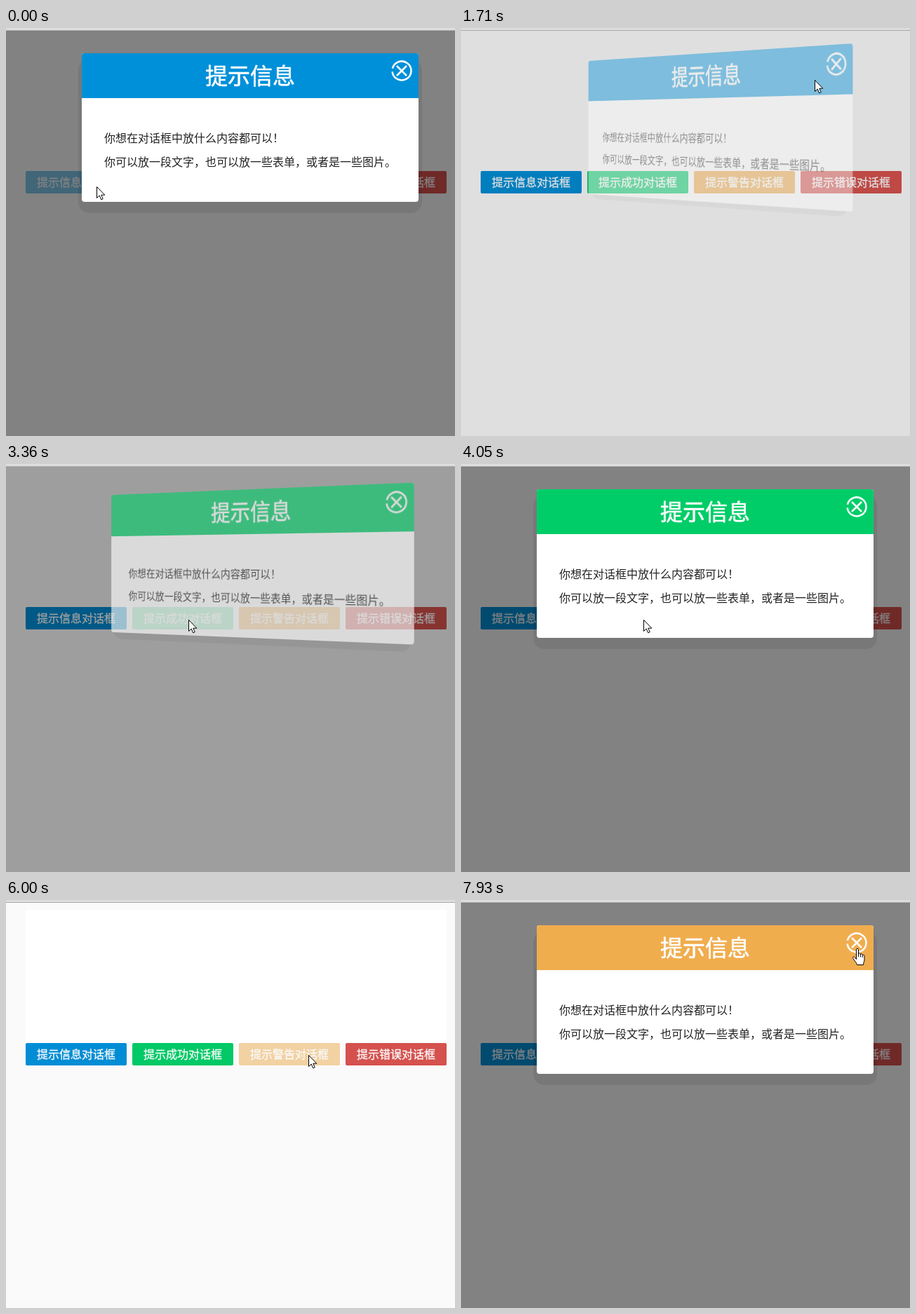
These frames come from a looping animation (640x582 px, 8 s). An HTML page:

```html
<!DOCTYPE html>
<html lang="zh-CN">
<head>
<meta charset="utf-8">
<title>提示信息对话框</title>
<style>
  html, body { margin: 0; width: 100%; height: 100%; overflow: hidden; background: #fff; }
  body { position: relative; font: 16px "Noto Sans CJK SC", "Noto Sans CJK", sans-serif; --blue: #0090d9; --green: #00cd68; --orange: #f0ad4e; --red: #d9534f; }
  div, svg { position: absolute; }
  div { white-space: nowrap; }
  #bar { left: 0; top: 0; width: 100%; height: 3px; background: #dedede; border-bottom: 1px solid #a9a9a9; }
  .btn { top: 204px; width: 144px; height: 32px; line-height: 31px; border-radius: 2px; text-align: center; color: #fff; -webkit-text-stroke: .3px; }
  #overlay { left: 0; top: 4px; right: 0; bottom: 0; background: #000; }
  #blank { left: 28px; top: 14px; width: 600px; height: 190px; background: #fff; }
  #dialog { left: 108px; top: 36px; width: 480px; height: 212px; will-change: opacity; }
  #shadow { z-index: -1; top: 8px; border-radius: 16px; background: rgba(0, 0, 0, .07); }
  #panel { inset: 0; border-radius: 4px; background: #fff; overflow: hidden; }
  #head { left: 0; top: 0; width: 480px; height: 64px; line-height: 60px; font-size: 32px; text-align: center; color: #fff; -webkit-text-stroke: .6px; }
  .line { left: 32px; height: 34px; line-height: 34px; color: #222; }
  #close { left: 440px; top: 9px; fill: none; stroke: #fff; stroke-width: 2.5; }
  .cursor { left: 0; top: 0; overflow: visible; fill: #fff; stroke: #000; stroke-width: 1; stroke-linejoin: round; }
</style>
</head>
<body>
<div id="bar"></div>
<div class="btn" style="left:28px;background:var(--blue)">提示信息对话框</div>
<div class="btn" style="left:180px;background:var(--green)">提示成功对话框</div>
<div class="btn" style="left:332px;background:var(--orange)">提示警告对话框</div>
<div class="btn" style="left:484px;background:var(--red)">提示错误对话框</div>
<div id="overlay"></div>
<div id="blank"></div>
<div id="dialog">
  <div id="shadow"></div>
  <div id="panel">
    <div id="head">提示信息</div>
    <svg id="close" width="32" height="32" viewBox="-16 -16 32 32">
      <path d="M-13.1 -3.2A13.5 13.5 0 1 1 -13.4 1.4M-7 -7L7 7M7 -7L-7 7"/>
    </svg>
    <div class="line" style="top:103px">你想在对话框中放什么内容都可以！</div>
    <div class="line" style="top:137px">你可以放一段文字，也可以放一些表单，或者是一些图片。</div>
  </div>
</div>
<svg class="cursor" id="arrow" width="13" height="20"><path d="M.5 .5V16.5L4.2 13L6.7 18.8L9.2 17.7L6.8 12.2H11.8Z"/></svg>
<svg class="cursor" id="hand" width="20" height="25">
  <path d="M-1.5 15.5V1.5C-1.5 -.2 1.5 -.2 1.5 1.5V8C1.5 6.3 4.3 6.5 4.3 8.2V9C4.5 7.4 7.2 7.6 7.2 9.3V10C7.6 8.7 10 9 10 10.8V16C10 19 8.5 20 8.5 23.5H-.5C-1 20.5 -3.5 18.5 -6 14.5C-7.4 12.3 -5 11 -3.5 13Z"/>
  <path d="M1.5 8V12M4.3 9V12.5M7.2 10V13" fill="none"/>
</svg>
<script>
const LOOP = 8000;
const STEP = 140; // usual time between screen refreshes
const LAG = .12;  // dialog follows the overlay by this share of the fade
const $ = id => document.getElementById(id);
const buttons = [...document.querySelectorAll('.btn')];

// Bursts of activity; the pointer ends each one at x, y.
const moves = [
  { from: 0, to: 0, x: 129, y: 226 },
  { from: 280, to: 1440, x: 565, y: 68 },
  { from: 1560, to: 2280, x: 260, y: 222 },
  { from: 3120, to: 4050, x: 260, y: 222 },
  { from: 4060, to: 4640, x: 567, y: 65 },
  { from: 4790, to: 5600, x: 431, y: 221 },
  { from: 6000, to: 6520, x: 431, y: 221 },
  { from: 6680, to: 7810, x: 565, y: 69 }
];

const fades = [
  { at: -999, span: 600, open: true, color: 'blue' },
  { at: 1437, span: 600, open: false, color: 'blue' },
  { at: 3099, span: 600, open: true, color: 'green' },
  { at: 4655, span: 500, open: false, color: 'green' },
  { at: 5974, span: 430, open: true, color: 'orange' }
];

const show = (id, on) => $(id).style.visibility = on ? 'visible' : 'hidden';

// cubic-bezier(.25, .1, .25, 1)
function ease(p) {
  if (p <= 0) return 0;
  if (p >= 1) return 1;
  const curve = (u, a, b) => 3 * a * u * (1 - u) ** 2 + 3 * b * u * u * (1 - u) + u ** 3;
  let lo = 0, hi = 1;
  for (let i = 0; i < 20; i++) {
    const mid = (lo + hi) / 2;
    if (curve(mid, .25, .25) < p) lo = mid; else hi = mid;
  }
  return curve(lo, .1, 1);
}

// Progress through a move, in whole refreshes.
function progress({ from, to }, time) {
  const n = Math.max(1, Math.round((to - from) / STEP));
  return Math.min(n, Math.floor((time - from) / (to - from || 1) * n + .2)) / n;
}

function drawDialog(t) {
  const { at, span, open, color } = fades.findLast(f => f.at <= t);
  const p = (t - at) / span;
  const level = q => open ? ease(q) : 1 - ease(q);
  const o = level(p - LAG);
  const d = $('dialog').style;
  show('dialog', o > .002);
  show('blank', open && p < LAG); // this area repaints late
  $('overlay').style.opacity = .49 * level(p);
  $('head').style.background = `var(--${color})`;
  d.opacity = o;
  d.transform = o > .999 ? 'none' : `perspective(1300px) rotateY(${-70 * (1 - o)}deg)`;
  const side = 15 - 20 * o + 'px';
  Object.assign($('shadow').style, { left: side, right: side, bottom: -16 * o + 'px' });
}

function drawPointer(x, y) {
  const onClose = Math.hypot(x - 564, y - 61) < 16;
  for (const id of ['arrow', 'hand']) {
    $(id).style.transform = `translate(${x}px, ${y}px)`;
    show(id, (id === 'hand') === onClose);
  }
  for (const b of buttons) {
    const dx = x - b.offsetLeft, dy = y - b.offsetTop;
    const over = dx >= 0 && dx < b.offsetWidth && dy >= 0 && dy < b.offsetHeight;
    b.style.opacity = over ? .5 : 1;
  }
}

function draw(time) {
  const i = moves.findLastIndex(m => m.from <= time);
  const b = moves[i], a = moves[i - 1] || b;
  const p = progress(b, time);
  drawDialog(b.from + (b.to - b.from) * p);
  drawPointer(Math.round(a.x + (b.x - a.x) * p), Math.round(a.y + (b.y - a.y) * p * p));
}

const begin = performance.now();
function frame() {
  draw((performance.now() - begin) % LOOP);
  requestAnimationFrame(frame);
}
frame();
</script>
</body>
</html>
```
